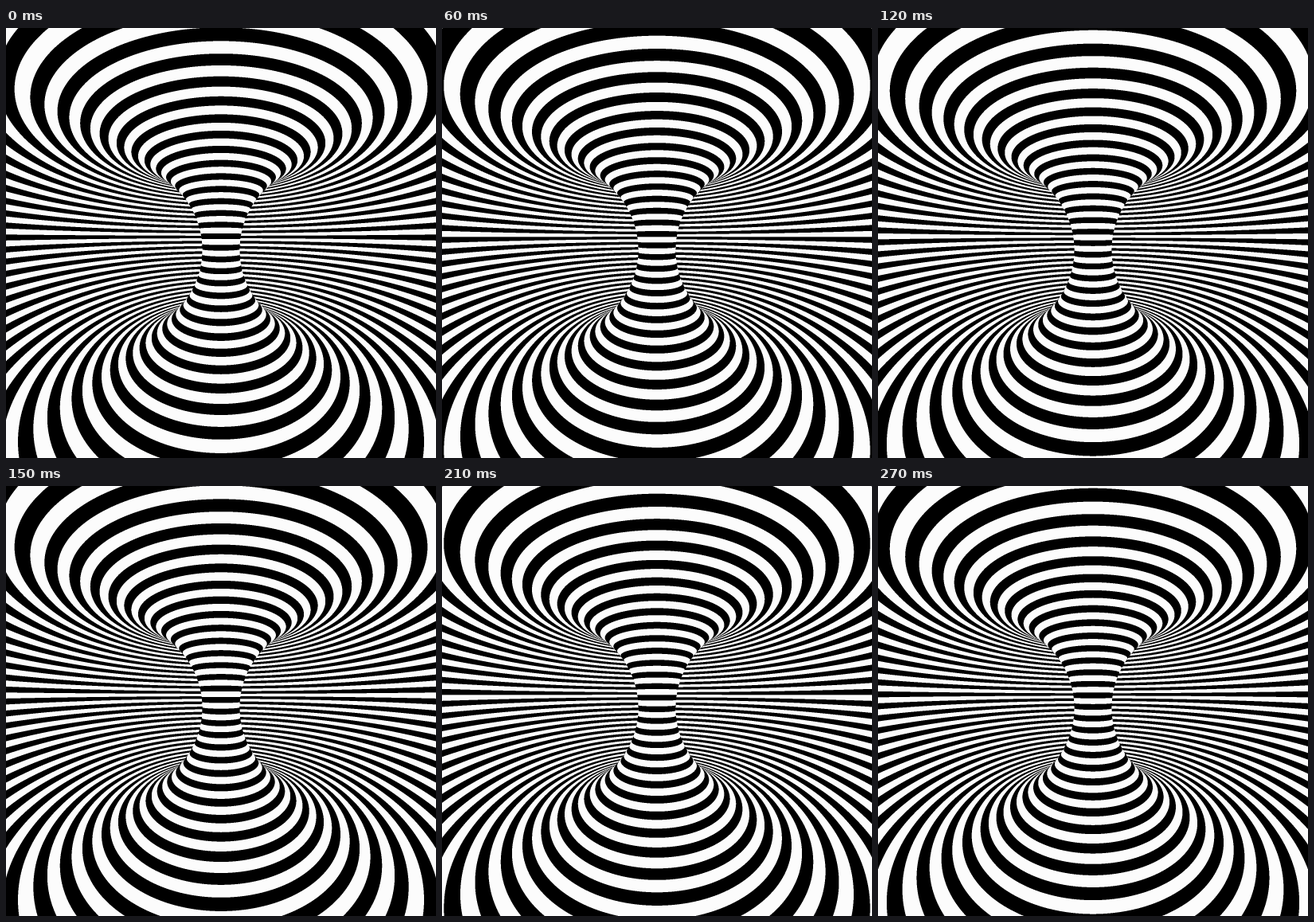
Animation of 540 by 540 pixels, one loop 300 ms. Source, as an HTML page with a canvas:

```html
<!DOCTYPE html>
<html lang="en">
<head>
<meta charset="utf-8">
<title>Torus stripes</title>
<style>
  html, body { margin: 0; width: 100%; height: 100%; overflow: hidden; background: #000; }
  canvas { display: block; width: 540px; height: 540px; }
</style>
</head>
<body>
<canvas id="stage" width="540" height="540"></canvas>
<script>
  const SIZE = 540, HALF = SIZE / 2, GRID = 3, SAMPLES = GRID * GRID;
  const LOOP = 300, STEPS = 10, STRIPES = 51, WHITE = 252;

  // Torus seen from within the tube; the eye is one unit from the axis.
  const FOCAL = 228, HORIZON = 262;
  const MAJOR = 0.567, MINOR = 0.465, EYE = 0.0725;
  const START = 86.1 / 360 * STRIPES;

  const ctx = document.getElementById('stage').getContext('2d');

  // Marches one ray to the wall and returns the stripe coordinate there.
  function trace(dx, dy) {
    const len = Math.sqrt(1 + dx * dx + dy * dy);
    let z = 0.08, across = 0, up = 0;
    for (let i = 0; i < 70; i++) {
      const depth = 1 - z, side = dx * z;
      across = Math.sqrt(depth * depth + side * side) - MAJOR;
      up = EYE + dy * z;
      const gap = MINOR - Math.sqrt(across * across + up * up);
      if (gap < 1e-4) break;
      z += gap / len;
    }
    return Math.atan2(up, across) / (2 * Math.PI) * STRIPES - START;
  }

  // The view is symmetric, so only the right half is traced.
  const surface = new Float32Array(HALF * SIZE * SAMPLES);
  let n = 0;
  for (let y = 0; y < SIZE; y++) {
    for (let x = 0; x < HALF; x++) {
      for (let s = 0; s < SAMPLES; s++) {
        const sx = x + (s % GRID + 0.5) / GRID;
        const sy = y + (Math.floor(s / GRID) + 0.5) / GRID;
        surface[n++] = trace(sx / FOCAL, (HORIZON - sy) / FOCAL);
      }
    }
  }

  function paint(shift) {
    const image = ctx.createImageData(SIZE, SIZE);
    const pixels = new Uint32Array(image.data.buffer);
    let k = 0;
    for (let y = 0; y < SIZE; y++) {
      for (let x = 0; x < HALF; x++) {
        let light = 0;
        for (let s = 0; s < SAMPLES; s++) {
          const q = surface[k++] + shift + 0.25;
          if (q - Math.floor(q) >= 0.5) light++;
        }
        const c = Math.round(light / SAMPLES * WHITE);
        const colour = 0xff000000 | c << 16 | c << 8 | c;
        pixels[y * SIZE + HALF + x] = colour;
        pixels[y * SIZE + HALF - 1 - x] = colour;
      }
    }
    return image;
  }

  const poses = Array.from({ length: STEPS }, (_, i) => paint(i / STEPS));
  let shown = -1;

  function draw() {
    const step = Math.floor(performance.now() % LOOP / LOOP * STEPS + 1e-6) % STEPS;
    if (step !== shown) ctx.putImageData(poses[shown = step], 0, 0);
    requestAnimationFrame(draw);
  }
  draw();
</script>
</body>
</html>
```
